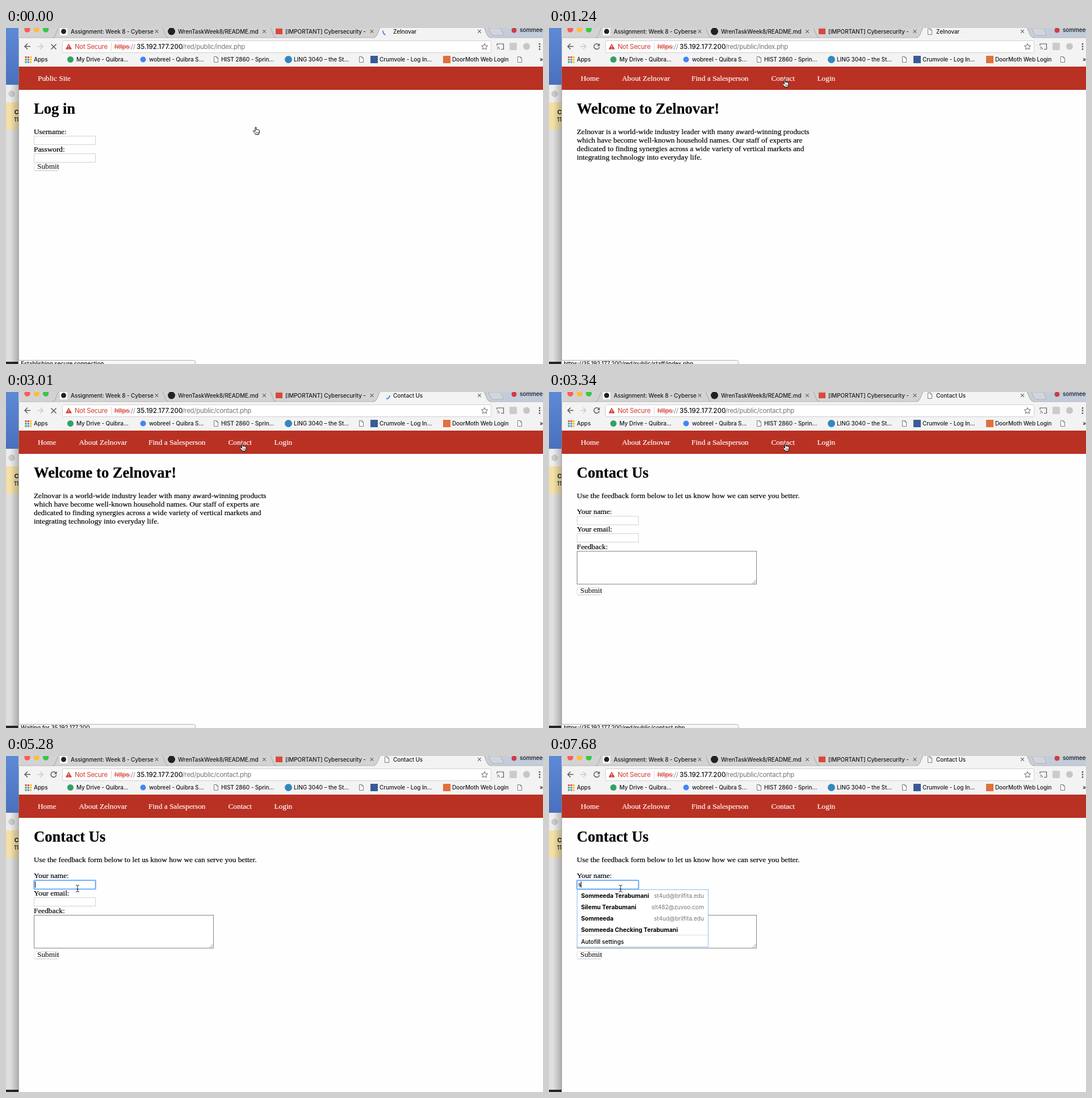
Recreate the animation shown at these times as an HTML page. Size 946 px wide and 592 px high, loop 8 s.

```html
<!DOCTYPE html>
<html lang="en">
<head>
<meta charset="utf-8">
<title>Contact form</title>
<style>
  html, body { margin: 0; width: 100%; height: 100%; overflow: hidden; background: #fff; }
  svg { display: block; width: 946px; height: 592px; }
  text { white-space: pre; }
  .ui { font: 500 10px Inter, Roboto, sans-serif; letter-spacing: -.1px; fill: #1c1c1c; }
  .url { font: 11.5px Inter, Roboto, sans-serif; letter-spacing: -.3px; }
  .url .host { font-weight: 500; letter-spacing: .1px; }
  .page { font: 13.3px "Liberation Serif", Times, serif; }
  .page text { fill: #000; stroke: #000; stroke-width: .2; }
  .page .h1 { font-size: 26.6px; font-weight: bold; }
  .page .nav { fill: #fff; stroke: #fff; }
  .page .ctl { font: 500 9.2px Inter, Roboto, sans-serif; stroke: none; }
  .pop { font: 500 10.1px Inter, Roboto, sans-serif; fill: #000; }
  .pop .name { font-size: 10.4px; font-weight: 700; }
  .pop .mail { font-weight: 400; fill: #777; text-anchor: end; }
  .box { fill: #fff; stroke: #d2d2d2; }
  .line { fill: none; stroke: #5a5a5a; stroke-width: 1.5; }
</style>
</head>
<body>
<svg viewBox="0 0 946 592">
  <defs>
    <linearGradient id="sky" x2="0" y2="1">
      <stop stop-color="#5d8ad6"/><stop offset="1" stop-color="#4a70bd"/>
    </linearGradient>
    <linearGradient id="shade">
      <stop offset=".1" stop-opacity="0"/><stop offset="1" stop-opacity=".22"/>
    </linearGradient>
    <linearGradient id="strip">
      <stop offset=".85" stop-color="#d3d3d3"/><stop offset=".93" stop-color="#c3ccda"/>
    </linearGradient>
    <path id="doc" d="M.5.5h4.5l2.5 2.5v7.5h-7zM5 .5v2.5h2.5" fill="#fff" stroke="#6b6b6b" stroke-width=".9"/>
    <path id="close" d="M-2.8-2.8l5.6 5.6M2.8-2.8l-5.6 5.6" stroke="#666" stroke-width="1.2"/>
    <g id="button">
      <rect x=".5" y=".5" width="43" height="13" rx="2.5" fill="#fff" stroke="#dedede"/>
      <path d="M2 13.5h40" stroke="#c4c4c4"/>
      <text class="ctl" x="6" y="10">Submit</text>
    </g>
    <rect id="field" class="box" x="49.5" y=".5" width="108" height="15"/>
  </defs>

  <!-- desktop behind the window -->
  <rect width="22" height="592" fill="#dedede"/>
  <rect width="22" height="100" fill="url(#sky)"/>
  <rect y="100" width="22" height="31" fill="#ececec"/>
  <circle cx="10" cy="116" r="5" fill="#cdcdcd" stroke="#bbb"/>
  <rect y="131" width="22" height="48" fill="#f4e0a6"/>
  <rect y="588" width="22" height="4" fill="#25271f"/>
  <rect x="6" y="100" width="16" height="488" fill="url(#shade)"/>
  <text class="ui" x="14.5" y="152" style="font-weight:700;font-size:11px">C</text>
  <text class="ui" x="14" y="165">11</text>

  <!-- tab strip -->
  <rect x="22" width="924" height="68" fill="#f3f3f3"/>
  <rect x="22" width="924" height="17" fill="url(#strip)"/>
  <path d="M22 17H650M852 17H946" stroke="#b3b3b3"/>
  <path d="M82 17q4-1 5-5l5-12M286 17q-4-1-5-5l-5-12M476 17q-4-1-5-5l-5-12" fill="none" stroke="#a6a6a6"/>
  <path d="M647 17.5q5-1 7-6l5-12h183l5 12q2 5 7 6z" fill="#f3f3f3"/>
  <path d="M647 17q5-1 7-6l5-12M842-1l5 12q2 5 7 6" fill="none" stroke="#a6a6a6"/>
  <path d="M850 0l5 11q1 2 3 2h17q2 0 1-2l-5-11z" fill="#d2d6dc" stroke="#a9afb8"/>
  <g id="lights"></g>
  <rect x="95" y="-1" width="13" height="14" fill="#fff"/>
  <circle cx="101.5" cy="6" r="4.5" fill="#222"/>
  <circle cx="291.5" cy="6" r="6.5" fill="#222"/>
  <rect x="475" y="1" width="12" height="10" fill="#d9483b"/>
  <circle cx="895" cy="4" r="4.5" fill="#cf3b40"/>
  <g class="ui">
    <text x="114" y="9.5">Assignment: Week 8 - Cyberse</text>
    <text x="303" y="9.5">WrenTaskWeek8/README.md</text>
    <text x="492" y="9.5">[IMPORTANT] Cybersecurity -</text>
    <text id="title" x="682" y="9.5"></text>
    <text x="905" y="7">sommeeda</text>
  </g>
  <g id="closes"></g>
  <use id="favicon" href="#doc" x="667" y="1"/>
  <path id="spin" d="M6 0A6 6 0 0 1 0 6" fill="none" stroke-width="2"/>

  <!-- toolbar -->
  <path class="line" d="M43 32.5H33M38 27.5l-5 5 5 5"/>
  <path class="line" d="M55 32.5h10M60 27.5l5 5-5 5" style="stroke:#cbcbcb"/>
  <g id="reload">
    <path class="line" d="M88 29.8A4.8 4.8 0 1 0 88.7 33.5"/>
    <path d="M89.5 27v4.8h-4.8z" fill="#5a5a5a"/>
  </g>
  <path id="stop" class="line" d="M79.5 28.5l9 9M88.5 28.5l-9 9"/>
  <rect x="99.5" y="22.5" width="755" height="21" rx="2.5" fill="#fff" stroke="#d0d0d0"/>
  <path d="M110.5 27.5l5.5 10h-11z" fill="#d23c30"/>
  <path d="M110.5 31v3M110.5 35v1.3" stroke="#fff" stroke-width="1.2"/>
  <path d="M185.5 26v14" stroke="#d5d5d5"/>
  <g class="url">
    <text x="121" y="37" fill="#d23c30">Not Secure</text>
    <text x="191" y="37" fill="#d23c30">https<tspan fill="#888">://</tspan></text>
    <path d="M191 33.5h27" stroke="#d23c30"/>
    <text class="host" x="230" y="37" fill="#111">35.192.177.200</text>
    <text id="path" x="310.5" y="37" fill="#777"></text>
  </g>
  <path d="M843 27.5l1.6 3.5 3.9.4-2.9 2.6.8 3.8-3.4-1.9-3.4 1.9.8-3.8-2.9-2.6 3.9-.4z" fill="none" stroke="#606060"/>
  <path class="line" d="M865 31v-3h11.5v9.5H872M865 33.5a4 4 0 0 1 4 4M865 36.5a1 1 0 0 1 1 1" style="stroke-width:1.2"/>
  <rect x="887" y="26" width="13" height="13" rx="2" fill="#cbcbcb"/>
  <circle cx="917" cy="32.5" r="6" fill="#c6c6c6"/>
  <path d="M940 27v2.5M940 31.5v2.5M940 36v2.5" stroke="#555" stroke-width="2.5"/>

  <!-- bookmarks -->
  <g id="apps"></g>
  <circle cx="113.5" cy="55.5" r="5.5" fill="#2fa463"/>
  <circle cx="241.5" cy="55.5" r="5" fill="#4285f4"/>
  <circle cx="497.5" cy="55.5" r="6.5" fill="#3388bd"/>
  <rect x="642" y="49" width="13" height="13" fill="#3b5998"/>
  <rect x="770" y="49" width="13" height="13" fill="#e2703a"/>
  <use href="#doc" x="366" y="50"/><use href="#doc" x="622" y="50"/><use href="#doc" x="901" y="50"/>
  <g class="ui">
    <text x="49" y="59.3">Apps</text>
    <text x="124" y="59.3">My Drive - Quibra...</text>
    <text x="252" y="59.3">wobreel - Quibra S...</text>
    <text x="379" y="59.3">HIST 2860 - Sprin...</text>
    <text x="507" y="59.3">LING 3040 – the St...</text>
    <text x="658" y="59.3">Crumvole - Log In...</text>
    <text x="786" y="59.3">DoorMoth Web Login</text>
    <text x="940" y="58.5">»</text>
  </g>

  <!-- pages -->
  <rect x="22" y="68" width="924" height="524" fill="#fefefe"/>
  <rect x="22" y="68" width="924" height="41" fill="#b93123"/>
  <path d="M22.5 18v574" stroke="#8d8d8d" stroke-opacity=".7"/>
  <g class="page">
    <g id="login">
      <text class="nav" x="56" y="93">Public Site</text>
      <text class="h1" x="49" y="150.5">Log in</text>
      <text x="49" y="187">Username:</text>
      <use href="#field" y="190"/>
      <text x="49" y="218">Password:</text>
      <use href="#field" y="221"/>
      <use href="#button" x="49" y="238"/>
    </g>
    <g id="menu">
      <text class="nav" x="56" y="93">Home</text>
      <text class="nav" x="128.5" y="93">About Zelnovar</text>
      <text class="nav" x="251" y="93">Find a Salesperson</text>
      <text class="nav" x="391.5" y="93">Contact</text>
      <text class="nav" x="472.5" y="93">Login</text>
    </g>
    <g id="home">
      <text class="h1" x="49" y="150.5">Welcome to Zelnovar!</text>
      <text x="49" y="187">Zelnovar is a world-wide industry leader with many award-winning products</text>
      <text x="49" y="202">which have become well-known household names. Our staff of experts are</text>
      <text x="49" y="217">dedicated to finding synergies across a wide variety of vertical markets and</text>
      <text x="49" y="232">integrating technology into everyday life.</text>
    </g>
    <g id="contact">
      <text class="h1" x="49" y="150.5">Contact Us</text>
      <text x="49" y="187">Use the feedback form below to let us know how we can serve you better.</text>
      <text x="49" y="215">Your name:</text>
      <use href="#field" y="218.5"/>
      <text x="49" y="246">Your email:</text>
      <use href="#field" y="249"/>
      <text x="49" y="276.5">Feedback:</text>
      <rect x="49.5" y="280.5" width="316" height="58" fill="#fff" stroke="#858585"/>
      <path d="M358.5 337.5l6-6M361.5 337.5l3-3" stroke="#777" stroke-width=".8"/>
      <use href="#button" x="49" y="344"/>
      <rect id="focus" x="49.2" y="219" width="108.6" height="15.5" rx="1.5" fill="#fff" stroke="#73b0f7" stroke-width="2.2"/>
      <text id="typed" class="ctl" x="51.5" y="230.3"></text>
      <path id="caret" d="M0 221v11" stroke="#000"/>
    </g>
  </g>
  <g id="pop" class="pop"></g>

  <!-- status bubble -->
  <g id="status">
    <path d="M22 585.5h308.500q3 0 3 3V593H22z" fill="#f7f7f7" stroke="#b0b0b0"/>
    <text id="note" class="ui" x="26" y="595"></text>
  </g>

  <!-- pointers -->
  <g id="hand" stroke="#000" stroke-linejoin="round">
    <path d="M4 1.7c0-1.5 2-1.5 2 0v3.6c.4-.8 1.8-.7 2 .2.4-.7 1.7-.5 1.8.4.7-.5 1.7-.1 1.7.8v2.3c0 1.5-1 2.3-1 4.5H4.6c-.3-1.8-2.6-3.4-3.9-5.3-.7-1.2.8-1.9 1.6-1L4 8.4z" fill="#fff"/>
    <path d="M6 9v2.5M8 9v2.5M9.7 9v2.5" stroke-width=".7"/>
  </g>
  <path id="arrow" d="M0 0v11l2.5-2.3 1.8 4.1 2-.9-1.8-4h3.4z" fill="#000" stroke="#fff" stroke-width=".8"/>
  <path id="beam" d="M-3 .5q2.5 0 3 1.5.5-1.5 3-1.5M0 2v9M-3 12.5q2.5 0 3-1.5.5 1.5 3 1.5M-1.5 7.5h3" fill="none" stroke="#222"/>
</svg>

<script>
const LOOP = 8000;
const $ = id => document.getElementById(id);
const show = (id, on) => { $(id).style.display = on ? '' : 'none'; };
const move = (id, x, y) => $(id).setAttribute('transform', `translate(${x} ${y})`);

$('lights').innerHTML = ['#fc5b57', '#fdbc40', '#34c84a']
  .map((c, i) => `<circle cx="${37.5 + i * 16.3}" cy="2.5" r="5.2" fill="${c}"/>`).join('');
$('closes').innerHTML = [265.5, 455, 644.5, 834]
  .map(x => `<use href="#close" x="${x}" y="6"/>`).join('');
const dots = ['#ea4335', '#ea4335', '#fbbc05', '#34a853', '#4285f4', '#fbbc05', '#34a853', '#4285f4', '#fbbc05'];
$('apps').innerHTML = dots
  .map((c, i) => `<rect x="${33.5 + i % 3 * 4.3}" y="${50 + (i / 3 | 0) * 4.3}" width="3" height="3" fill="${c}"/>`).join('');

const site = 'https://35.192.177.200/red/public/';
const waiting = 'Waiting for 35.192.177.200...';

// Each track lists [start time, value...]; a value holds until the next start.
const tracks = {
  page: [[0, 'login'], [460, 'home'], [3190, 'contact']],
  title: [[0, 'Zelnovar'], [2860, 'Contact Us']],
  path: [[0, 'index'], [2410, 'contact']],
  spin: [[0, '#4b8bea'], [770, ''], [2410, '#8a8f96'], [2860, '#4b8bea'], [3190, '']],
  note: [[0, 'Establishing secure connection...'], [300, waiting], [770, ''],
    [920, site + 'staff/index.php'], [1390, site + 'contact.php'],
    [2410, waiting], [3340, site + 'contact.php'], [3480, '']],
  pointer: [[0, 'hand', 435, 174], [460, 'arrow', 446, 158], [610, 'arrow', 466, 128],
    [770, 'arrow', 478, 112], [920, 'hand', 476, 91], [1090, 'hand', 462, 91],
    [1240, 'hand', 410.5, 90.5], [1390, 'hand', 411.5, 90.5], [3480, 'arrow', 366, 122],
    [3630, 'arrow', 250, 180], [3780, 'arrow', 148, 228], [3930, 'arrow', 122, 234],
    [4080, 'beam', 126, 227]],
  focus: [[0, 0], [4230, 1]],
  typed: [[0, ''], [5730, 'S'], [6180, 'So'], [6630, 'Som'], [6780, 'So'], [7230, 'S'], [7380, 's']],
  caret: [[0, 0], [4230, 1], [4680, 0], [5280, 1], [7380, 0], [7680, 1]],
};

const people = [
  ['Sommeeda Terabumani', 'st4ud@brilfita.edu'],
  ['Silemu Terabumani', 'slt482@zuvoo.com'],
  ['Sommeeda', 'st4ud@brilfita.edu'],
  ['Sommeeda Checking Terabumani', ''],
];

function popup(typed) {
  if (!typed) return '';
  const rows = people.filter(([name]) => name.toLowerCase().startsWith(typed.toLowerCase()));
  const end = rows.length * 20 + 235.5;
  const row = ([name, mail], i) => {
    const y = 249.7 + i * 20;
    return `<text class="name" x="56.5" y="${y}">${name}</text><text class="mail" x="273" y="${y}">${mail}</text>`;
  };
  return `<rect x="49.5" y="235.5" width="231" height="${end - 214.5}" fill="#fff" stroke="#8dbcf0"/>`
    + rows.map(row).join('')
    + `<path d="M50 ${end}h230" stroke="#dcdcdc"/>`
    + `<text x="56.5" y="${end + 15}">Autofill settings</text>`;
}

const at = (track, t) => track.findLast(([start]) => start <= t);
let last = '';

function draw(t) {
  const s = {};
  for (const key in tracks) s[key] = at(tracks[key], t)[1];
  const [, kind, x, y] = at(tracks.pointer, t);
  for (const id of ['login', 'home', 'contact']) show(id, s.page === id);
  show('menu', s.page !== 'login');
  for (const id of ['hand', 'arrow', 'beam']) show(id, id === kind);
  move(kind, x, y);

  for (const id of ['spin', 'stop']) show(id, s.spin);
  for (const id of ['favicon', 'reload']) show(id, !s.spin);
  const tick = Math.floor((t + 5) / 150.5);
  $('spin').setAttribute('stroke', s.spin || 'none');
  $('spin').setAttribute('transform', `translate(670 6) rotate(${105 + tick * 30.75})`);

  $('title').textContent = s.title;
  $('path').textContent = `/red/public/${s.path}.php`;
  $('note').textContent = s.note;
  show('status', s.note);

  show('focus', s.focus);
  show('caret', s.caret);
  $('typed').textContent = s.typed;
  const width = s.typed ? $('typed').getComputedTextLength() : 0;
  move('caret', Math.round(51 + width) + 0.5, 0);
  if (s.typed !== last) $('pop').innerHTML = popup(last = s.typed);
}

const begin = performance.now();
function loop() {
  draw((performance.now() - begin) % LOOP);
  requestAnimationFrame(loop);
}
loop();
</script>
</body>
</html>
```
